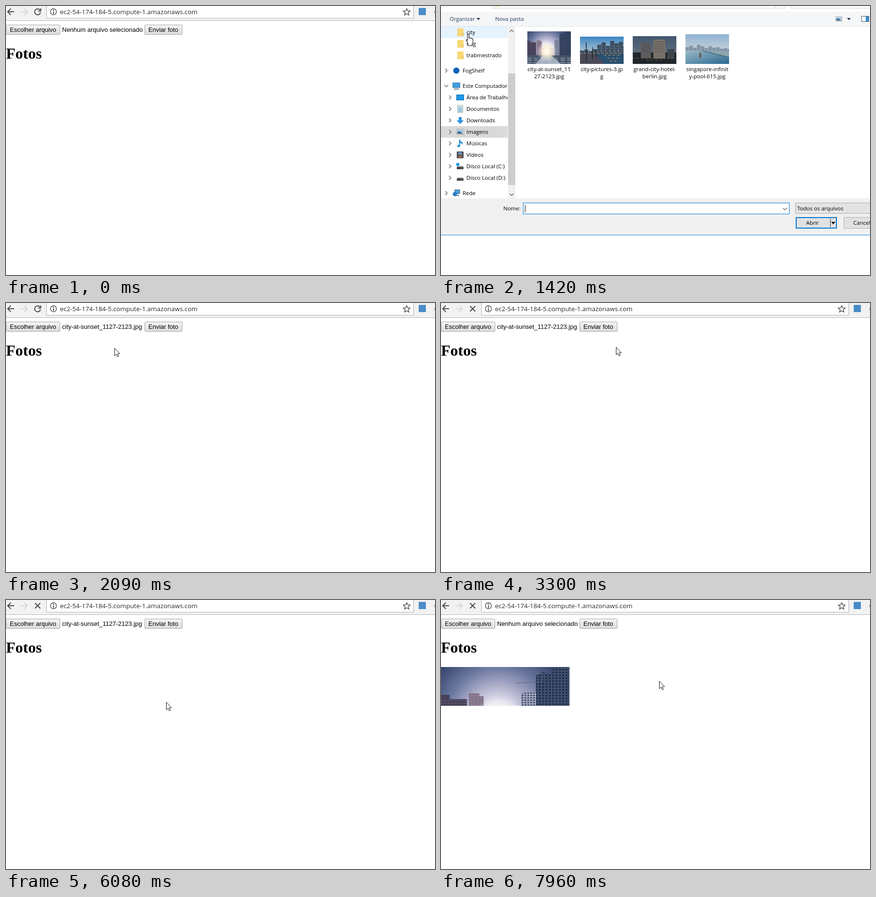
An HTML page that plays this animation: 895 px wide and 562 px high, repeating every 8 s.

```html
<!DOCTYPE html>
<html lang="pt-BR">
<head>
<meta charset="utf-8">
<title>Fotos</title>
<style>
html, body { margin: 0; width: 100%; height: 100%; overflow: hidden; background: #fff; }
svg { display: block; }
text { white-space: pre; }
.url { font: 13.4px "Open Sans", sans-serif; fill: #2b2b2b; }
.page { font: 13px "Liberation Sans", Arial, sans-serif; }
.title { font: bold 32px "Liberation Serif", serif; }
#dialog text { font: 11.5px "Open Sans", sans-serif; }
#dialog .tool { fill: #1e395b; }
.mid { text-anchor: middle; }
.line { fill: none; stroke: #4a4650; stroke-width: 2; }
.thin { fill: none; stroke: #555; stroke-width: 1.2; }
</style>
</head>
<body>
<svg id="stage" width="895" height="562" viewBox="0 0 895 562">
  <defs>
    <linearGradient id="face" x2="0" y2="1"><stop stop-color="#f5f5f5"/><stop offset="1" stop-color="#dcdcdc"/></linearGradient>
    <radialGradient id="glow" gradientUnits="userSpaceOnUse" cx="118" cy="108" r="165">
      <stop stop-color="#fff"/><stop offset=".22" stop-color="#e6e2f0"/><stop offset=".42" stop-color="#aeaeca"/>
      <stop offset=".66" stop-color="#6a779f"/><stop offset="1" stop-color="#2d3c64"/>
    </radialGradient>
    <radialGradient id="sun">
      <stop offset=".15" stop-color="#fffdf0"/><stop offset=".5" stop-color="#fff0cc" stop-opacity=".7"/><stop offset="1" stop-color="#fff" stop-opacity="0"/>
    </radialGradient>
    <linearGradient id="dusk" x2="0" y2="1"><stop stop-color="#3b86c4"/><stop offset=".6" stop-color="#b5c6d2"/></linearGradient>
    <linearGradient id="evening" x2="0" y2="1"><stop stop-color="#40566e"/><stop offset=".7" stop-color="#65707c"/></linearGradient>
    <linearGradient id="haze" x2="0" y2="1"><stop stop-color="#8fb3d0"/><stop offset=".6" stop-color="#cbd3dc"/></linearGradient>
    <linearGradient id="water" x2="1" y2="1"><stop stop-color="#9db9c8"/><stop offset="1" stop-color="#28688f"/></linearGradient>
    <pattern id="windows" width="7" height="6" patternUnits="userSpaceOnUse">
      <rect width="7" height="6" fill="#263350"/><path d="M1 2.500h4M6.500 0v6" stroke="#6b7a9b"/>
    </pattern>
    <pattern id="litWindows" width="6" height="5" patternUnits="userSpaceOnUse">
      <rect width="6" height="5" fill="#4d5877"/><path d="M1 2h4M5.500 0v5" stroke="#d3d4e4" stroke-width="1.500"/>
    </pattern>
    <symbol id="sunset" viewBox="0 0 268 201">
      <rect width="268" height="201" fill="url(#glow)"/>
      <path d="M0 58h18v9h36v85H0z" fill="#48435a"/>
      <path d="M0 70h54M0 76h54" stroke="#77687a" stroke-dasharray="4 3"/>
      <path d="M58 55h22v6h9v92H58z" fill="#84748a"/>
      <path d="M61 60h18M61 66h26M61 72h26M61 78h26" stroke="#a894a2" stroke-dasharray="4 3"/>
      <path d="M92 100h72v52H92z" fill="#b9a9b2" opacity=".5"/>
      <path d="M168 56l12-6 18 5v98h-30z" fill="url(#litWindows)"/>
      <path d="M198 18l14-8 20 6v137h-34zM232 6l16-6h20v153h-36z" fill="url(#windows)"/>
      <path d="M155 34l57-4M212 10v20" stroke="#56658a" fill="none"/>
      <path d="M0 148h268v53H0z" fill="#46546a"/>
      <path d="M95 148h50l62 53H52z" fill="#a4afbf"/>
      <path d="M0 166h268M0 178h268M0 193h268" stroke="#bfcad6" stroke-width="4" stroke-dasharray="26 15" opacity=".7"/>
      <circle cx="119" cy="124" r="62" fill="url(#sun)"/>
    </symbol>
  </defs>

  <rect width="895" height="562" fill="#fff"/>
  <path d="M0 0h895v30H0z" fill="#f2f2f2"/>
  <path d="M0 30.500h895" stroke="#b5b3b5"/>
  <path d="M84.500-5V25.500h766V-5" fill="#fff" stroke="#b0afb0"/>
  <path class="line" d="M17 12H4M10 5.500L3.500 12 10 18.500"/>
  <path class="line" style="stroke:#d6d6d2" d="M31 12H44M38 5.500L44.500 12 38 18.500"/>
  <path id="reload" class="line" d="M71 8.500A6.200 6.200 0 1 0 72 13.500M72.500 5V10.500H67"/>
  <path id="stop" class="line" d="M60.500 6.500l11 11M71.500 6.500l-11 11"/>
  <circle cx="99" cy="12" r="6.200" fill="none" stroke="#4a4650" stroke-width="1.400"/>
  <path class="line" d="M99 8v2M99 11.500v4.500"/>
  <text class="url" x="112.500" y="17">ec2-54-174-184-5.compute-1.amazonaws.com</text>
  <path d="M836 5.500l2 4.700 5.100.400-3.900 3.300 1.200 5-4.400-2.700-4.400 2.700 1.200-5-3.900-3.300 5.100-.4z" fill="none" stroke="#4a4650" stroke-width="1.400"/>
  <rect x="861" y="4" width="15" height="15" fill="#4a8cc8"/>
  <path d="M894 10h1v5h-1z" fill="#b5472f"/>

  <g class="page">
    <rect id="choose" x=".5" y="39.500" width="112" height="20" rx="1" fill="url(#face)" stroke="#a6a6a6"/>
    <text x="8" y="54">Escolher arquivo</text>
    <text id="chosen" x="117" y="54"></text>
    <rect id="send" x="289.500" y="39.500" width="78" height="20" rx="1" fill="url(#face)" stroke="#a6a6a6"/>
    <text x="297" y="54">Enviar foto</text>
  </g>
  <text class="title" x="0" y="110">Fotos</text>
  <clipPath id="loaded"><rect id="loadedBox" y="140" width="268" height="0"/></clipPath>
  <g clip-path="url(#loaded)"><use href="#sunset" y="140" width="268" height="201"/></g>

  <g id="dialog"></g>
  <path id="arrow" d="M.5.500V16.500L4.200 13 6.700 18.500 9 17.500 6.600 12H11.500z" fill="#fff" stroke="#1a1420"/>
  <path id="hand" d="M-2.500 12V.500a1.600 1.600 0 0 1 3.200 0V7q2.600-1.300 3 .5 2.200-1 2.700.8 2.200-.5 2.200 1.700v5q0 3-2 5.500v2.500H-1V20L-5-1.500 0 0" fill="#fff" stroke="#222" stroke-width="1.200"/>
</svg>
<script>
const $ = id => document.getElementById(id);
const FILE = 'city-at-sunset_1127-2123.jpg';
$('hand').setAttribute('d', 'M-2.500 12V.500a1.600 1.600 0 0 1 3.200 0V7q2.600-1.300 3 .5 2.200-1 2.700.8 2.200-.5 2.200 1.700v5q0 3-2 5.500V23H-1V20L-5 12.500q-1-2.300 1-2.200z');
const rect = (x, y, w, h, fill, more = '') =>
  `<rect x="${x}" y="${y}" width="${w}" height="${h}" fill="${fill}" ${more}/>`;
const path = (d, attrs) => `<path d="${d}" ${attrs}/>`;
const label = (x, y, s, cls = '') => `<text x="${x}" y="${y}" class="${cls}">${s}</text>`;
const caret = (x, y) => path(`M${x - 4} ${y - 2}h8l-4 4.500z`, 'fill="#1e395b"');
const chevron = (x, y, turn) =>
  path('M-4-2L0 2 4-2', `class="thin" transform="translate(${x} ${y}) rotate(${turn})"`);

// Sidebar icons, drawn in a 16 by 16 box
const disk = rect(1, 9, 14, 5, '#444') + rect(2, 7, 12, 2, '#b5b5b5') + rect(11, 11, 2, 1, '#8f8');
const picture = rect(.5, 2.5, 15, 11, '#fff', 'stroke="#999"') + rect(2, 4, 12, 5, '#8fc0e8') +
  path('M2 12V8l4-1 8 4v1z', 'fill="#40627c"');
const icons = {
  folder: rect(2, 0, 13, 16, '#f8d775') + rect(13, 9, 2, 7, '#e9bd50'),
  cloud: '<circle cx="8" cy="8" r="6.500" fill="#0a64b8"/>',
  computer: rect(.5, 1.5, 15, 10, '#3ba0e6', 'stroke="#4b6f8c"') + path('M3 14.500h10', 'stroke="#678" stroke-width="2"'),
  desktop: rect(.5, 2.5, 15, 11, '#1b9af0', 'stroke="#14629c"'),
  page: rect(2.5, .5, 11, 15, '#fff', 'stroke="#8a9"') + path('M4 4h4M9 4h3M4 7h8M4 10h8M4 13h8', 'stroke="#3a90c8" stroke-width="1.500"'),
  down: path('M5 1h6v7h4.500L8 15.500.5 8H5z', 'fill="#2f8fdd"'),
  picture,
  note: path('M6 0h2q0 4 5 6 1 3-1 5 0-3-4-4v5q0 4-3.500 4-3 0-2.500-2.500T6 11z', 'fill="#1e8fd8"'),
  film: rect(1, 1, 14, 14, '#222') + rect(4, 2, 8, 6, '#6f93b8') + rect(4, 9, 8, 5, '#a06a52') +
    path('M2.500 1v14M13.500 1v14', 'stroke="#eee" stroke-dasharray="1.500 1.500"'),
  system: disk + rect(0, 1, 6, 6, '#1b9af0'),
  disk,
  network: rect(5, 1, 10, 8, '#4ba3dd', 'stroke="#357"') + '<circle cx="5" cy="10" r="4.500" fill="#2b7ec1"/>' + rect(7, 12, 7, 2, '#789'),
};
const rows = [
  [55, 'folder', 'city'], [79, 'folder', 'img'], [103, 'folder', 'trabmestrado'],
  [135, 'cloud', 'FogShelf', 1], [167, 'computer', 'Este Computador', 1],
  [191, 'desktop', 'Área de Trabalho'], [215, 'page', 'Documentos'], [239, 'down', 'Downloads'],
  [263, 'picture', 'Imagens'], [287, 'note', 'Músicas'], [311, 'film', 'Vídeos'],
  [335, 'system', 'Disco Local (C:)'], [359, 'disk', 'Disco Local (D:)'], [391, 'network', 'Rede', 1],
];
const sidebar = rows.map(([y, icon, name, top]) => {
  const x = top ? 24 : 32;
  const mark = y < 120 ? '' : chevron(x - 13, y, icon === 'computer' ? 0 : -90);
  return mark + `<g transform="translate(${x} ${y - 8})">${icons[icon]}</g>` + label(x + 21, y + 4, name);
}).join('');

const skyline = (tops, base, step, fill) =>
  tops.map((y, i) => rect(i * step, y, step - .5, base - y, fill)).join('');
const thumb = (x, y, h, art) => `<svg x="${x}" y="${y}" width="91" height="${h}">${art}</svg>`;
const thumbs =
  '<use href="#sunset" x="180" y="53" width="91" height="68"/>' +
  thumb(290, 64, 57, rect(0, 0, 91, 57, 'url(#dusk)') +
    skyline([29, 27, 30, 26, 17, 12, 19, 9, 14, 11, 20], 36, 9, '#3d4d60') +
    path('M40 20h50M38 25h52M36 30h54', 'stroke="#8a8f96" stroke-dasharray="2 4"') +
    rect(0, 35, 91, 22, '#29506f') + path('M0 36h32l18 21H0z', 'fill="#4b4a57"') +
    path('M0 35h91M50 39h34M57 45h24M62 51h18', 'stroke="#d8a060" stroke-dasharray="5 4"') +
    path('M13 12v42M26 22v25M34 28v14', 'stroke="#182430" stroke-width="1.500"')) +
  thumb(400, 63, 58, rect(0, 0, 91, 58, 'url(#evening)') + rect(0, 34, 91, 24, '#20272b') +
    rect(17, 14, 21, 32, '#5d5d5f') + rect(43, 7, 25, 40, '#777068') + rect(72, 27, 15, 20, '#3f444b') +
    path('M19 17h17M19 22h17M19 27h17M19 32h17M45 12h21M45 17h21M45 22h21M45 27h21M45 32h21', 'stroke="#393c42" stroke-dasharray="2 1"') +
    path('M0 46h91M30 50h35', 'stroke="#9a8052" stroke-dasharray="3 6"')) +
  thumb(510, 59, 62, rect(0, 0, 91, 62, 'url(#haze)') +
    skyline([27, 24, 28, 22, 25, 29, 25, 28, 27, 30, 29, 31], 36, 8, '#8496a6') +
    rect(0, 34, 91, 28, 'url(#water)') + path('M36 35L91 48V35z', 'fill="#8fa5ac"') +
    path('M36 35L91 48', 'stroke="#3d6579" stroke-width="1.500"') +
    '<circle cx="31" cy="40" r="2" fill="#6c5850"/>' + rect(29, 42, 4, 7, '#6c5850'));
const captions = [
  [225.5, 'city-at-sunset_11', '27-2123.jpg'], [335.5, 'city-pictures-3.jp', 'g'],
  [445.5, 'grand-city-hotel-', 'berlin.jpg'], [555.5, 'singapore-infinit', 'y-pool-615.jpg'],
].map(([x, a, b]) => label(x, 136, a, 'mid') + label(x, 151, b, 'mid')).join('');

$('dialog').innerHTML =
  rect(0, 0, 895, 478, '#fff') +
  path('M106.500 0V4.500H717.500V0M697.500 0V4M729.500 0V4.500H895', 'fill="none" stroke="#d0d0d0"') +
  rect(111, 0, 13, 1, '#f3c94f') +
  rect(0, 12, 895, 30, '#f5f6f7') + path('M0 42.500h895', 'stroke="#e2e5e9"') +
  label(18, 31, 'Organizar', 'tool') + caret(78, 27) + label(113, 31, 'Nova pasta', 'tool') +
  `<g transform="translate(823 20) scale(.88)">${picture}</g>` + caret(851, 27) +
  rect(877.5, 21.5, 15, 11, '#fff', 'stroke="#456"') + rect(886, 22, 6, 10, '#3c8fd0') +
  rect(0, 43, 139, 24, '#e5f3ff', 'id="rowHover"') + rect(0, 251, 139, 24, '#d9d9d9') + sidebar +
  rect(139, 43, 17, 359, '#fff') + rect(140, 43, 15, 359, '#f0f0f0') + rect(140, 141, 15, 233, '#cdcdcd') +
  chevron(147.5, 52, 180) + chevron(147.5, 394, 0) +
  rect(172, 46, 107, 112, '#e5f3ff', 'id="fileHover"') + thumbs + captions +
  rect(0, 402, 895, 76, '#f0f0f0') + path('M0 478.500h895', 'stroke="#1883d7"') +
  label(130, 427, 'Nome:') + rect(171.5, 411.5, 555, 23, '#fff', 'stroke="#0078d7"') +
  path('M175.500 416v15', 'stroke="#000" id="caret"') + label(175, 427, '', 'name') + chevron(717.5, 424, 0) +
  rect(739.5, 411.5, 170, 22, '#e3e3e3', 'stroke="#adadad"') + label(743, 427, 'Todos os arquivos') +
  rect(741, 442, 84, 22, '#e1e1e1', 'stroke="#0078d7" stroke-width="2"') +
  path('M812.500 444v18', 'stroke="#333"') + path('M814 451h9l-4.500 5z', 'fill="#000"') +
  label(775, 457, 'Abrir', 'mid') +
  rect(840.5, 441.5, 80, 23, '#e1e1e1', 'stroke="#adadad"') + label(860, 457, 'Cancelar');
const nameField = document.querySelector('.name');

// Linear interpolation over rows of [step, ...values]
function along(keys, s) {
  let i = 1;
  while (i < keys.length - 1 && keys[i][0] < s) i++;
  const a = keys[i - 1], b = keys[i];
  const u = Math.min(1, Math.max(0, (s - a[0]) / (b[0] - a[0])));
  return a.slice(1).map((v, j) => v + (b[j + 1] - v) * u);
}
const travel = [
  [0, 646, 472], [2, 450, 300], [4, 200, 135], [6, 70, 58], [7, 58, 50], [9, 58, 50], [10, 58, 60], [12, 58, 60],
  [13, 120, 72], [14, 190, 88], [15, 226, 94], [18, 226, 94], [20, 275, 76], [22, 328, 50], [26, 328, 50],
  [27, 333, 62], [28, 347, 79], [29, 365, 92], [30, 425, 125], [31, 464, 180], [32, 440, 240], [33, 372, 225], [34, 386, 166],
];
// Angle and radii of the circling pointer
const orbit = [[34, -468, 62, 46], [45, 84, 57, 41.2], [64, 1038, 86.1, 56.8], [71, 1390, 77.8, 53.5]];

function pointer(s) {
  if (s < 34) return along(travel, s);
  const [deg, rx, ry] = along(orbit, s), a = deg * Math.PI / 180;
  return [405 + rx * Math.cos(a), 210 + ry * Math.sin(a)];
}
const show = (id, on) => $(id).style.display = on ? '' : 'none';

function draw(t) {
  const s = Math.floor((t - 80) / 110.6);
  const between = (a, b) => s >= a && s < b;
  const at = `translate(${pointer(s).map(Math.round)})`;
  const hand = between(10, 13);
  show('arrow', s >= 0 && !hand);
  show('hand', hand);
  $('arrow').setAttribute('transform', at);
  $('hand').setAttribute('transform', at);

  show('dialog', between(10, 18));
  $('dialog').style.opacity = s === 17 ? .08 : 1;
  show('rowHover', hand);
  show('fileHover', s >= 14);
  $('fileHover').setAttribute('fill', s >= 16 ? '#cce8ff' : '#e5f3ff');
  nameField.textContent = s >= 16 ? FILE : '';
  show('caret', s < 16);

  const waiting = s >= 24;
  show('reload', !waiting);
  show('stop', waiting);
  $('chosen').textContent = between(17, 69) ? FILE : 'Nenhum arquivo selecionado';
  $('choose').setAttribute('stroke', between(6, 10) ? '#777' : '#a6a6a6');
  $('send').setAttribute('stroke', between(22, 27) ? '#777' : '#a6a6a6');
  $('loadedBox').setAttribute('height', s >= 71 ? 81 : s === 70 ? 40 : 0);
}
function tick(now) {
  draw(now % 8000);
  requestAnimationFrame(tick);
}
draw(0);
requestAnimationFrame(tick);
</script>
</body>
</html>
```
